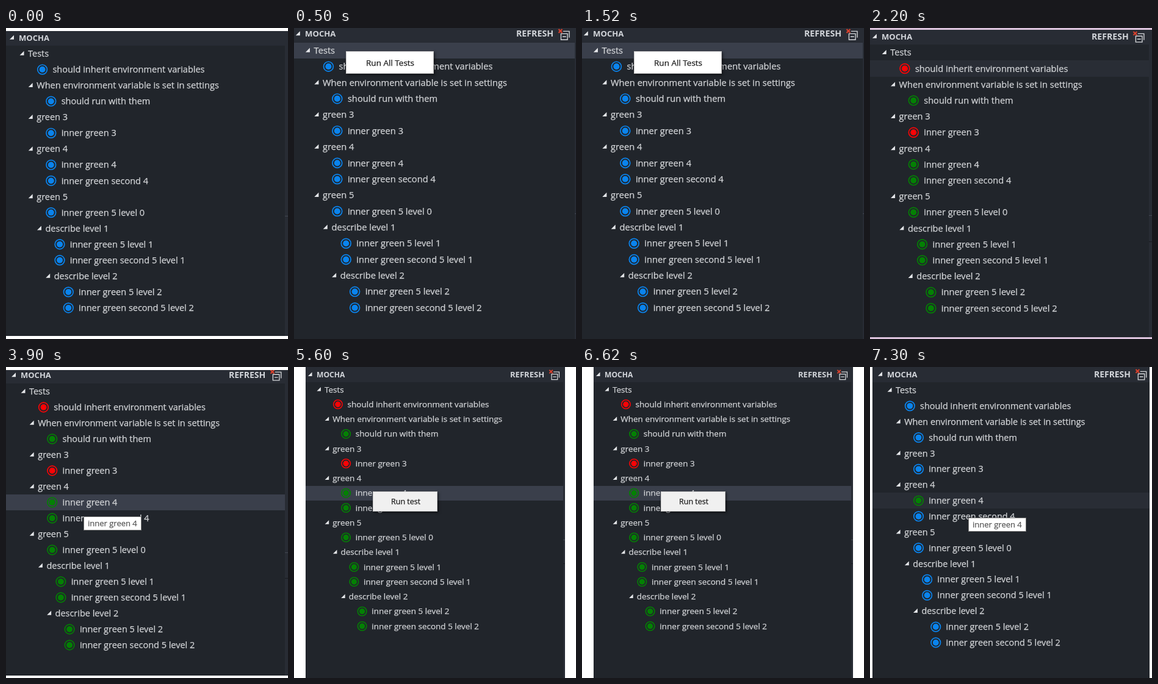
An HTML page with a canvas for the animation above (8 s loop, 462x510 px).

```html
<!DOCTYPE html>
<html>
<head>
<meta charset="utf-8">
<style>
html, body { margin: 0; width: 100%; height: 100%; overflow: hidden; background: #fff; }
canvas { display: block; }
</style>
</head>
<body>
<canvas width="462" height="510"></canvas>
<script>
const ctx = document.querySelector('canvas').getContext('2d');
const BLUE = '#0a84ee', GREEN = '#048004', RED = '#fb0406';
const SELECTED = '#3a3f4b', HOVER = '#292d35', EDGE = '#282c34';
const LOOP = 8000;

// [depth, label, is a test]
const rows = [
  [0, 'Tests'],
  [0, 'should inherit environment variables', 1],
  [1, 'When environment variable is set in settings'],
  [1, 'should run with them', 1],
  [1, 'green 3'],
  [1, 'inner green 3', 1],
  [1, 'green 4'],
  [1, 'inner green 4', 1],
  [1, 'inner green second 4', 1],
  [1, 'green 5'],
  [1, 'inner green 5 level 0', 1],
  [2, 'describe level 1'],
  [2, 'inner green 5 level 1', 1],
  [2, 'inner green second 5 level 1', 1],
  [3, 'describe level 2'],
  [3, 'inner green 5 level 2', 1],
  [3, 'inner green second 5 level 2', 1]
];

const idle = () => BLUE;
const ran = i => i === 1 || i === 5 ? RED : GREEN;
const oneRan = i => i === 7 ? GREEN : BLUE;

// box: panel edges; tree: first label x, y and row pitch; head: title x, y
const scenes = [
  { at: 0, box: [0, 5, 462, 505], tree: [36, 42, 26.06], head: [21, 16],
    strip: 457, marks: [308], color: idle },
  { at: 500, box: [0, 0, 462, 510], tree: [32.6, 36.8, 26.37], head: [18, 9.5],
    refresh: 364, icon: [432, 1], strip: 460, marks: [304], color: idle,
    row: [0, SELECTED], popup: { box: [85, 38, 229, 75], text: 'Run All Tests', x: 118, y: 57, size: 13.5, fill: '#fff', menu: true } },
  { at: 2200, box: [0, 3, 462, 507], tree: [33.3, 40.3, 26.2], head: [19, 14], margin: '#dcc3dc',
    refresh: 363, icon: [430, 5], strip: 457, marks: [307, 350], color: ran, row: [1, HOVER] },
  { at: 3900, box: [0, 5, 462, 506], tree: [38, 40, 26], head: [24, 13.5],
    refresh: 365, icon: [432, 4], strip: 457, marks: [304, 346], color: ran,
    row: [7, SELECTED], popup: { box: [127, 245, 222, 268], text: 'inner green 4', x: 134, y: 256.5, size: 13, fill: '#fff' } },
  { at: 5600, box: [19, 0, 444, 510], tree: [50, 37, 24.25], head: [37, 12.5],
    refresh: 354, icon: [417, 4], strip: 441, marks: [283, 322], color: ran,
    row: [7, SELECTED], popup: { box: [129, 204, 235, 237], text: 'Run test', x: 159, y: 221, size: 12.5, fill: '#f0f0f0', menu: true } },
  { at: 7300, box: [4, 0, 458, 510], tree: [42, 38, 25.87], head: [28, 12],
    refresh: 367, icon: [434, 3], strip: 458, marks: [], color: oneRan,
    row: [7, HOVER], popup: { box: [161, 247, 256, 270], text: 'inner green 4', x: 168, y: 258.5, size: 13, fill: '#fff' } }
];

function rect(l, t, r, b, fill) {
  ctx.fillStyle = fill;
  ctx.fillRect(l, t, r - l, b - t);
}

// A hairline outline gives the text a slightly heavier weight
function label(text, x, y, size, fill, weight = 400) {
  ctx.font = `${weight} ${size}px "Open Sans", "Noto Sans", sans-serif`;
  ctx.fillStyle = ctx.strokeStyle = fill;
  ctx.lineWidth = 0.25;
  ctx.fillText(text, x, y + size * 0.35);
  if (weight === 400) ctx.strokeText(text, x, y + size * 0.35);
}

function arrow(x, y, s) {
  ctx.fillStyle = '#e4e6e9';
  ctx.beginPath();
  ctx.moveTo(x + 7 * s, y - 4.2 * s);
  ctx.lineTo(x + 7 * s, y + 2.8 * s);
  ctx.lineTo(x, y + 2.8 * s);
  ctx.fill();
}

function badge(x, y, s, color) {
  ctx.fillStyle = ctx.strokeStyle = color;
  ctx.lineWidth = 1.7 * s;
  ctx.beginPath();
  ctx.arc(x, y, 7.8 * s, 0, 7);
  ctx.stroke();
  ctx.beginPath();
  ctx.arc(x, y, 5 * s, 0, 7);
  ctx.fill();
}

// Stacked boxes with a red cross
function collapseIcon(x, y, s) {
  ctx.save();
  ctx.translate(x, y);
  ctx.scale(s, s);
  ctx.strokeStyle = '#d4d6d9';
  ctx.lineWidth = 1.4;
  ctx.beginPath();
  ctx.moveTo(9, 4.5);
  ctx.lineTo(19.3, 4.5);
  ctx.lineTo(19.3, 15);
  ctx.rect(5.5, 8.5, 10.8, 10);
  ctx.moveTo(8, 13.5);
  ctx.lineTo(14, 13.5);
  ctx.stroke();
  ctx.strokeStyle = '#d8402c';
  ctx.lineWidth = 2.2;
  ctx.beginPath();
  ctx.moveTo(1.5, 1);
  ctx.lineTo(7.5, 7);
  ctx.moveTo(7.5, 1);
  ctx.lineTo(1.5, 7);
  ctx.stroke();
  ctx.restore();
}

function drawPopup({ box: [l, t, r, b], text, x, y, size, fill, menu }) {
  ctx.save();
  if (menu) {
    ctx.shadowColor = 'rgba(0,0,0,.5)';
    ctx.shadowBlur = 4;
    ctx.shadowOffsetX = ctx.shadowOffsetY = 2;
  }
  rect(l, t, r, b, menu ? '#c4c4c4' : '#777');
  ctx.restore();
  rect(l + 1, t + 1, r - 1, b - 1, fill);
  label(text, x, y, size, menu ? '#1c1c1c' : '#575757');
}

function draw(scene) {
  const [l, t, r, b] = scene.box, [x0, y0, pitch] = scene.tree, [hx, hy] = scene.head;
  const s = pitch / 26;
  rect(0, 0, 462, 510, scene.margin || '#fff');
  ctx.save();
  ctx.beginPath();
  ctx.rect(l, t, r - l, b - t);
  ctx.clip();
  rect(l, t, r, b, '#21252b');
  rect(l, t, r, y0 - pitch / 2, EDGE);
  if (scene.row) {
    const y = y0 + scene.row[0] * pitch;
    rect(l, Math.round(y - pitch / 2), scene.strip, Math.round(y + pitch / 2), scene.row[1]);
  }
  rect(scene.strip, t, r, b, EDGE);
  scene.marks.forEach((y, i) => rect(scene.strip, y, r, y + 1, i ? '#181a1f' : '#434852'));

  arrow(hx - 15 * s, hy, s);
  label('MOCHA', hx, hy, 13 * s, '#d2d5da', 700);
  if (scene.refresh) {
    label('REFRESH', scene.refresh, hy, 14 * s, '#d2d5da', 700);
    collapseIcon(...scene.icon, s * 0.97);
  }

  rows.forEach(([depth, text, test], i) => {
    const x = x0 + depth * 14.2 * s, y = y0 + i * pitch;
    if (test) badge(x + 23.5 * s, y, s, scene.color(i));
    else arrow(x - 13.5 * s, y, s);
    label(text, x + (test ? 40.3 * s : 0), y, 14.48 * s, '#d3d5d8');
  });
  if (scene.popup) drawPopup(scene.popup);
  ctx.restore();
}

function tick() {
  const time = performance.now() % LOOP;
  draw(scenes.filter(scene => scene.at <= time).pop());
  requestAnimationFrame(tick);
}
tick();
</script>
</body>
</html>
```
